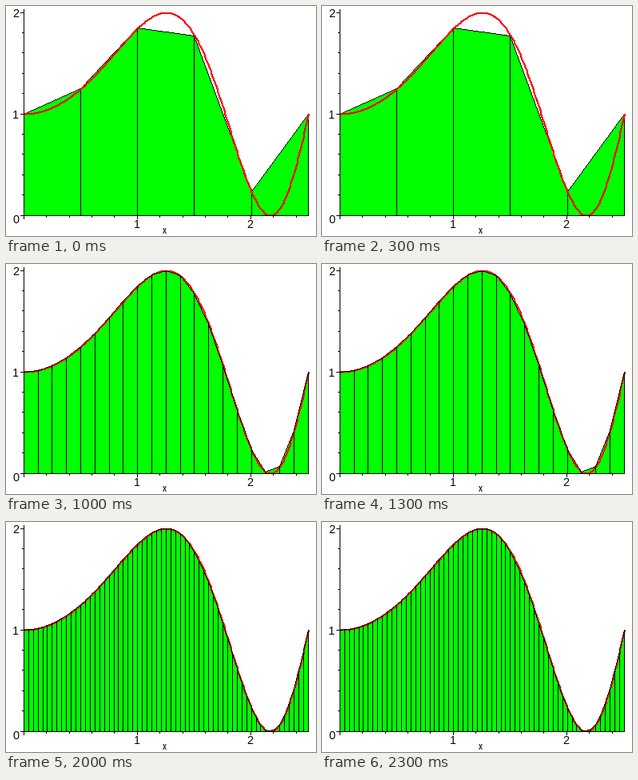
Write a matplotlib script that moves like this. It is 388x288 px and loops after 2.5 s.

```python
import numpy as np
import matplotlib.pyplot as plt
from matplotlib.animation import FuncAnimation

plt.rcParams.update({
    "text.hinting": "default",
    "text.hinting_factor": 1,
    "path.simplify": False,
    "font.family": "Liberation Sans",
})

W, H, DPI = 388, 288, 100
PX = 72 / DPI                      # one pixel in points
LEFT, RIGHT, BASE, UNIT_Y = 22, 378, 262, 127
END = np.sqrt(2 * np.pi)
UNIT_X = (RIGHT - LEFT) / END
PANELS = [5, 10, 20, 40, 60]


def curve(x):
    return 1 + np.sin(x ** 2)


def to_pixel(x, y):
    """Column and row of the pixel that holds a point of the plot."""
    return (np.floor(LEFT + UNIT_X * x + 0.3),
            np.floor(BASE - UNIT_Y * y + 1e-6))


def trace(cols, rows):
    """Pixels of a crisp line through the given pixels."""
    xs, ys = [], []
    for x0, y0, x1, y1 in zip(cols, rows, cols[1:], rows[1:]):
        n = int(max(abs(x1 - x0), abs(y1 - y0))) + 1
        xs.append(np.floor(np.linspace(x0, x1, n) + 0.5))
        ys.append(np.floor(np.linspace(y0, y1, n) + 0.5))
    return np.concatenate(xs), np.concatenate(ys)


def dots(cols, rows, size=1):
    """Line data that stamps a square of the given size at each pixel."""
    gap = np.full(len(cols), np.nan)
    y = rows + size / 2
    return (np.column_stack([cols, cols + size, gap]).ravel(),
            np.column_stack([y, y, gap]).ravel())


fig = plt.figure(figsize=(W / DPI, H / DPI), dpi=DPI, facecolor="white")
ax = fig.add_axes([0, 0, 1, 1])
ax.set_xlim(0, W)
ax.set_ylim(H, 0)
ax.axis("off")


def line(xs, ys, color="black", width=1, z=2):
    return ax.plot(xs, ys, color=color, lw=width * PX, zorder=z, snap=False,
                   antialiased=False, solid_capstyle="butt")[0]


def label(x, y, text, size=14, ha="left"):
    ax.text(x, y, text, size=size * PX, ha=ha, va="baseline", zorder=6)


# Axes with ticks every 0.2, longer at whole numbers
line([LEFT, RIGHT + 1], [BASE + 0.5] * 2, z=5)
line([LEFT + 0.5] * 2, [4, BASE + 1], z=5)
for i in range(13):
    size = 4 if i % 5 == 0 else 2
    col, row = to_pixel(i / 5, i / 5)
    line([col + 0.5] * 2, [BASE + 1, BASE + 1 + size], z=5)
    if i <= 10:
        line([LEFT - size, LEFT], [row + 0.5] * 2, z=5)

label(8, 14, "2")
label(8, 141, "1")
label(8, 272, "0")
label(164, 278, "1", ha="center")
label(305.5, 278, "2", ha="center")
label(196, 285, "x", size=12)

# Smooth curve
xs = np.linspace(0, END, 400)
line(*dots(*trace(*to_pixel(xs, curve(xs))), size=2),
     color="#ff0000", width=2, z=3)

# Trapezoids
fill = ax.fill([LEFT, RIGHT, RIGHT], [BASE] * 3, color="#00ff00", lw=0,
               zorder=1, antialiased=False, snap=False)[0]
chords = line([], [])
sides = line([], [])
edges = np.arange(LEFT, RIGHT + 1)


def draw(i):
    n = PANELS[i]
    x = np.linspace(0, END, n + 1)
    cols, rows = to_pixel(x, curve(x))

    # Stepped area under the chords, one column per pixel
    top = np.floor(np.interp(edges[:-1], cols, rows) + 0.5)
    fill.set_xy(np.column_stack([
        np.r_[LEFT, np.repeat(edges, 2)[1:-1], RIGHT],
        np.r_[BASE, np.repeat(top, 2), BASE]]))

    chords.set_data(*dots(*trace(cols, rows)))
    gap = np.full(n + 1, np.nan)
    sides.set_data(np.column_stack([cols + 0.5, cols + 0.5, gap]).ravel(),
                   np.column_stack([rows, gap * 0 + BASE, gap]).ravel())
    sides.set_ydata(np.column_stack(
        [rows, np.full(n + 1, BASE), gap]).ravel())

    # Finer partitions lie over the smooth curve
    for part in (chords, sides):
        part.set_zorder(2 if n <= 10 else 4)
    return fill, chords, sides


anim = FuncAnimation(fig, draw, frames=len(PANELS), interval=500,
                     repeat=True, repeat_delay=0, blit=False)
plt.show()
```
